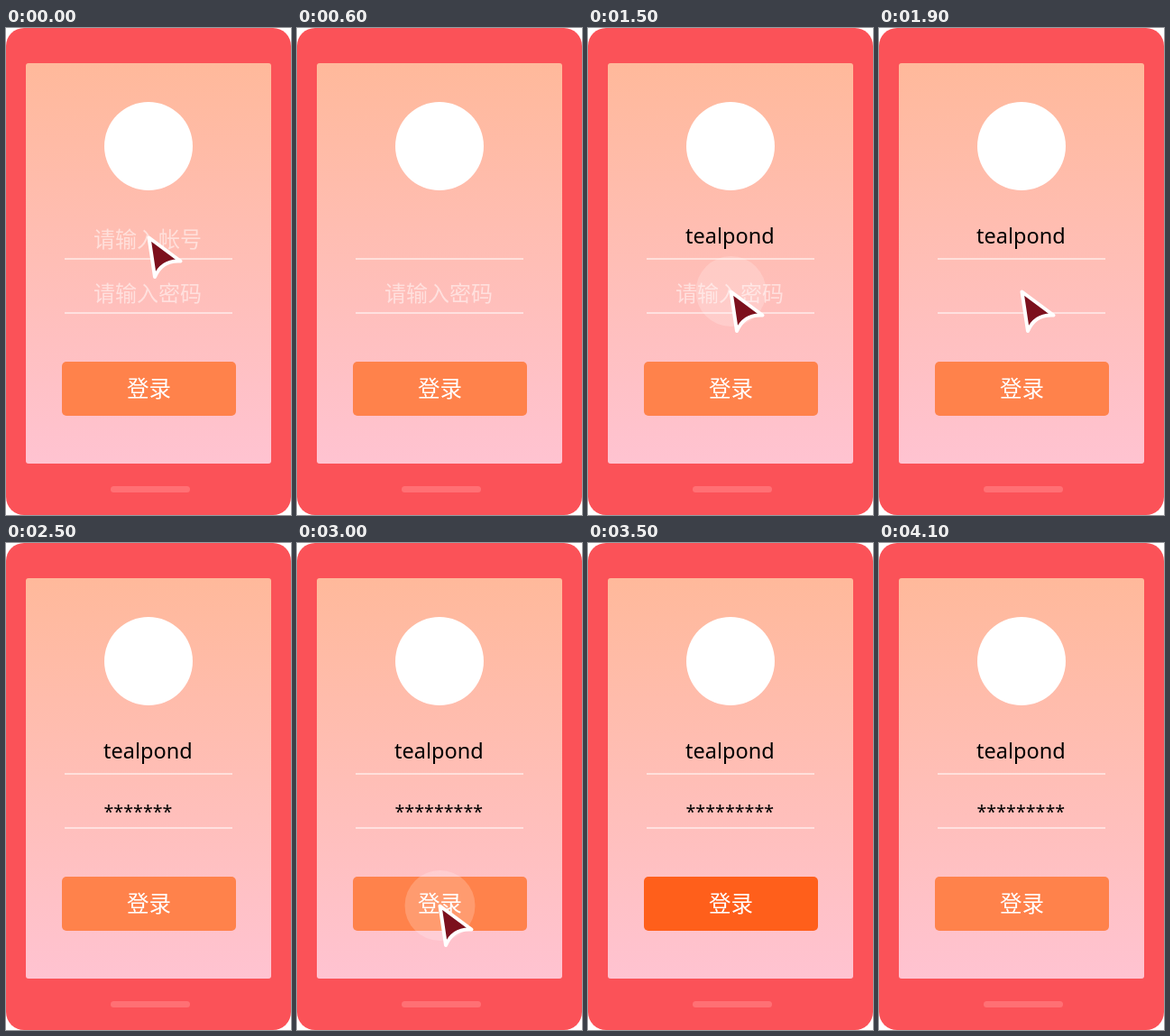
An HTML page with a canvas that plays this animation: 316 by 540 pixels, repeating every 4.2 s.

```html
<!DOCTYPE html>
<html lang="zh-CN">
<head>
<meta charset="utf-8">
<title>登录</title>
<style>
  html, body { margin: 0; width: 316px; height: 540px; overflow: hidden; background: #fff; }
  canvas { display: block; }
</style>
</head>
<body>
<canvas id="stage" width="316" height="540"></canvas>
<script>
const ctx = document.getElementById('stage').getContext('2d');
const LOOP = 4200, STEP = 100;
const LATIN = '"Noto Sans", "Open Sans", sans-serif';
const CJK = '"Noto Sans CJK SC", "Noto Sans CJK", sans-serif';
const ACCOUNT = 'tealpond';
const PASSWORD = '*'.repeat(9);

// Each tap: time the pointer appears, time it leaves, vertical position.
const taps = [
  { from: 0, to: 600, y: 232 },
  { from: 1300, to: 2000, y: 292 },
  { from: 2800, to: 3500, y: 402 }
];

const screenFill = ctx.createLinearGradient(0, 39, 0, 483);
screenFill.addColorStop(0, '#ffb99b');
screenFill.addColorStop(1, '#ffc3d1');

function box(x, y, w, h, r, fill) {
  ctx.fillStyle = fill;
  ctx.beginPath();
  ctx.roundRect(x, y, w, h, r);
  ctx.fill();
}

function disc(x, y, r, fill) {
  ctx.fillStyle = fill;
  ctx.beginPath();
  ctx.arc(x, y, r, 0, Math.PI * 2);
  ctx.fill();
}

function text(str, x, y, font, fill, align) {
  ctx.font = font;
  ctx.fillStyle = fill;
  ctx.textAlign = align;
  ctx.fillText(str, x, y);
}

function typed(str, t, start, duration) {
  const share = Math.min(1, Math.max(0, (t - start) / duration));
  return str.slice(0, Math.ceil(share * str.length));
}

function ripple(age, y) {
  if (age < 100 || age >= 400) return;
  const grow = Math.min(1, age / 200);
  const alpha = age < 300 ? 0.2 : 0.1;
  disc(158.5, y, 39 * Math.sqrt(grow), `rgba(255,255,255,${alpha})`);
}

function pointer(y) {
  ctx.save();
  ctx.translate(158, y);
  ctx.beginPath();
  ctx.moveTo(0.5, 0.5);
  ctx.lineTo(35.5, 26.5);
  ctx.quadraticCurveTo(15, 25, 7, 44);
  ctx.closePath();
  ctx.lineJoin = 'round';
  ctx.lineWidth = 4;
  ctx.strokeStyle = '#fff';
  ctx.fillStyle = '#7c101d';
  ctx.fill();
  ctx.stroke();
  ctx.restore();
}

function draw(t) {
  ctx.clearRect(0, 0, 316, 540);
  box(0, 0, 316, 540, 20, '#fb5258');
  box(22, 39, 272, 444, 3, screenFill);
  box(116, 508, 88, 7, 3.5, '#ff7074');
  disc(158, 131, 49, '#fff');

  const hint = 'rgba(255,255,255,0.52)';
  const hintFont = '300 24px ' + CJK;
  if (t < 400) text('请输入帐号', 157, 243, hintFont, hint, 'center');
  if (t < 1800) text('请输入密码', 157, 303, hintFont, hint, 'center');
  text(typed(ACCOUNT, t, 600, 700), 108, 239, '23.5px ' + LATIN, '#000', 'left');
  text(typed(PASSWORD, t, 1900, 800), 108.5, 305, '19.7px ' + LATIN, '#000', 'left');
  ctx.fillStyle = hint;
  ctx.fillRect(65, 255, 186, 2);
  ctx.fillRect(65, 315, 186, 2);

  const pressed = t >= 3300 && t < 4000;
  box(62, 370, 193, 60, 5, pressed ? '#ff5f1b' : '#ff824b');
  text('登录', 158.5, 408.5, '24.5px ' + CJK, '#fff', 'center');

  for (const tap of taps) {
    if (t < tap.from || t >= tap.to) continue;
    ripple(t - tap.from, tap.y);
    pointer(tap.y);
  }
}

const begin = performance.now();
function frame() {
  const t = (performance.now() - begin) % LOOP;
  draw(Math.floor(t / STEP) * STEP);
  requestAnimationFrame(frame);
}
frame();
</script>
</body>
</html>
```
